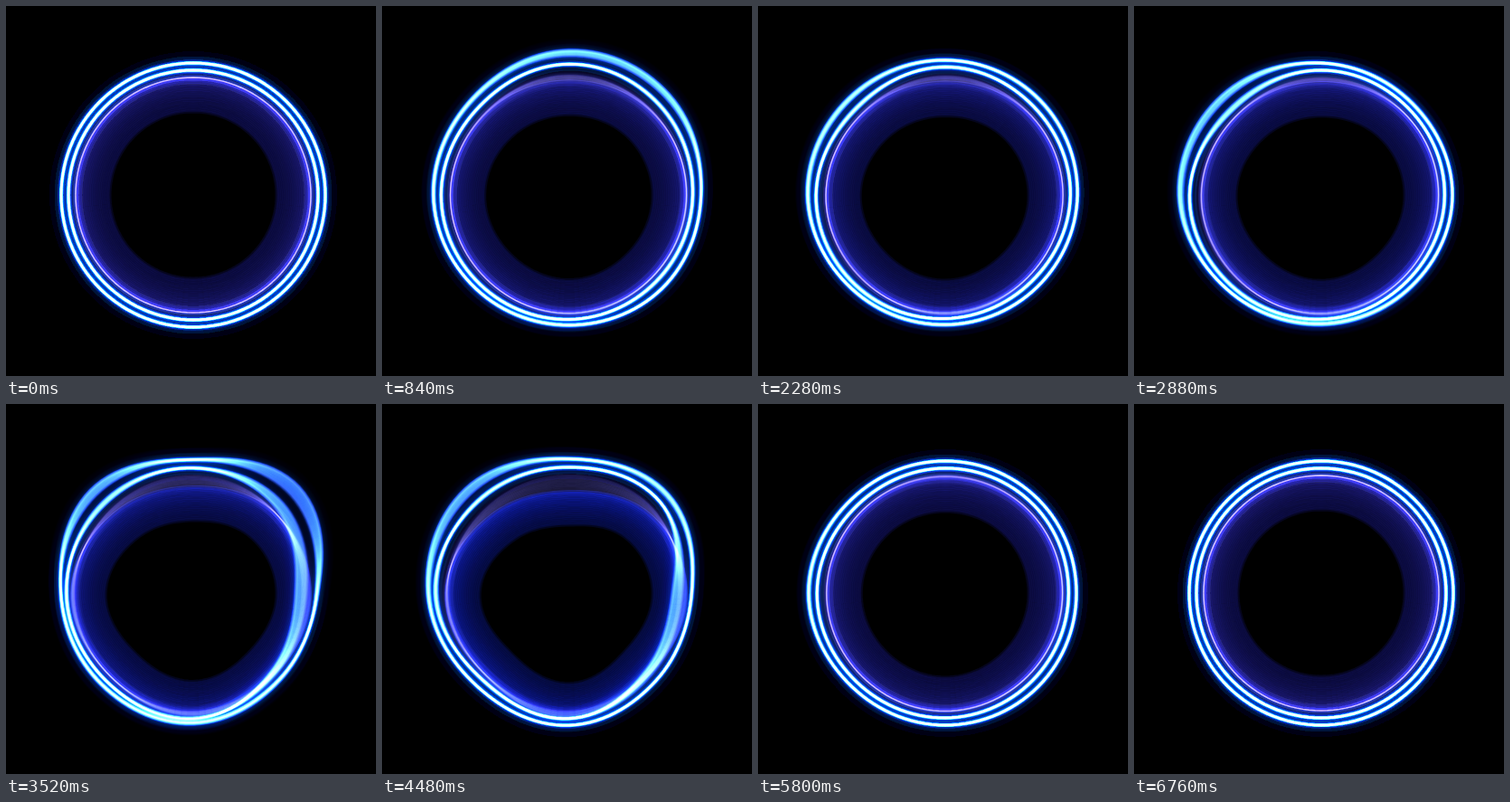
Write an HTML page with a canvas that moves like this. It is 409x409 px and loops after 6800 ms.

```html
<!DOCTYPE html>
<html lang="en">
<head>
<meta charset="utf-8">
<title>Glowing ring</title>
<style>
html, body { margin: 0; width: 100%; height: 100%; overflow: hidden; background: #000; }
canvas { display: block; width: 100vw; height: 100vh; }
</style>
</head>
<body>
<canvas id="stage" width="409" height="409"></canvas>
<script>
const ctx = document.getElementById('stage').getContext('2d');
const LOOP = 6800, STEP = 40, CX = 207, CY = 209, POINTS = 120;
const FLAT = [0, 0, 0, 0, 0, 0, 0, 0];

// Radial offsets at eight angles, clockwise from the right, per key time.
const TIMES = [0, 720, 1680, 2880, 3520, 4480, 5040, 5800, 6760];
const OUTER = [
  FLAT,
  [0, 0, -3, 0, 5, 6, 14, 10],
  [0, -1, -2, -2, 1, 3, 8, 13],
  [-1, -5, -5, 1, 12, 10, 0, -4],
  [-8, -12, -4, -4, 0, 15, 2, 20],
  [-10, -10, 0, -1, 11, 17, 3, 9],
  [-6, -5, 0, 3, 20, 11, 2, 2],
  [-1, 0, 0, 0, 6, 1, 0, 0],
  FLAT
];
const INNER = [
  FLAT,
  [-2, -3, 0, 2, 4, 1, 6, 2],
  [-1, -5, -2, 2, 2, 0, 8, 1],
  [-2, -4, 0, 4, 8, -3, 0, -2],
  [-25, -16, 2, -1, 3, 0, 0, -7],
  [-24, -18, 1, -3, 11, 4, 1, 4],
  [-14, -10, 1, 2, 12, 2, 0, 1],
  [-2, -2, 0, 1, 4, -1, 0, 0],
  FLAT
];
const DENT = [0, 3, 5, 5, 12, 17, 11, 2, 0];
const DENT_SHAPE = [0, -.2, .45, 0, .4, -.45, -1, -.3];

const mix = (a, b, u) => a + (b - a) * u;
const blend = (a, b, u, scale = 1) => a.map((v, i) => mix(v, b[i], u) * scale);

function hermite(a, b, ma, mb, u) {
  const u2 = u * u, u3 = u2 * u;
  return a * (2 * u3 - 3 * u2 + 1) + ma * (u3 - 2 * u2 + u) +
    b * (3 * u2 - 2 * u3) + mb * (u3 - u2);
}

// Smooth value of a keyed channel at time t.
function keyed(t, value) {
  const last = TIMES.length - 1;
  if (t >= TIMES[last]) return value(last);
  let k = 0;
  while (t >= TIMES[k + 1]) k++;
  const span = TIMES[k + 1] - TIMES[k];
  const slope = i => i === 0 || i === last ? 0 :
    (value(i + 1) - value(i - 1)) / (TIMES[i + 1] - TIMES[i - 1]) * span;
  return hermite(value(k), value(k + 1), slope(k), slope(k + 1), (t - TIMES[k]) / span);
}

// Resample eight angle samples to a closed smooth curve.
function spread(shape) {
  const at = i => shape[(i + 8) % 8];
  return Array.from({ length: POINTS }, (_, n) => {
    const x = n / POINTS * 8, i = Math.floor(x);
    return hermite(at(i), at(i + 1), (at(i + 1) - at(i - 1)) / 2,
      (at(i + 2) - at(i)) / 2, x - i);
  });
}

const shapeAt = (table, t) =>
  spread(FLAT.map((_, i) => keyed(t, k => table[k][i])));

function loopPath(radius, offsets) {
  const path = new Path2D();
  offsets.forEach((d, n) => {
    const a = n / POINTS * Math.PI * 2, r = radius + d;
    path.lineTo(CX + r * Math.cos(a), CY + r * Math.sin(a));
  });
  path.closePath();
  return path;
}

function stroke(path, width, r, g, b) {
  ctx.lineWidth = width;
  ctx.strokeStyle = `rgb(${Math.round(r)},${Math.round(g)},${Math.round(b)})`;
  ctx.stroke(path);
}

// A fan of faint strands that burns white where they coincide.
function brightFan(radius, near, far) {
  const count = 20;
  for (let i = 0; i < count; i++) {
    const u = Math.pow(i / (count - 1), 1.4);
    const path = loopPath(radius, blend(near, far, .4 * u, 1 - .3 * u));
    stroke(path, 25, 0, 0, 1);
    stroke(path, 14, 0, 1, 2);
    stroke(path, 7, 0, 1, 5);
    stroke(path, 4, 1, 8, 34);
    stroke(path, 2.8, 13, 13, 8);
  }
}

function lilacFan(dent, inner) {
  const count = 12, wide = blend(inner, FLAT_CURVE, .6);
  for (let i = 0; i < count; i++) {
    const path = loopPath(130, blend(dent, wide, i / (count - 1)));
    stroke(path, 14, 1, 1, 3);
    stroke(path, 6, 2, 2, 6);
    stroke(path, 1.4, 14, 12, 20);
  }
}

function dimBand(dent, depth) {
  const count = 20, warm = 1 - depth / 30;
  for (let i = 0; i < count; i++) {
    const v = i / (count - 1);
    stroke(loopPath(mix(92.5, 129, v), dent), 4,
      (5 + 9 * v * v) * warm, 5 + 8 * v * v, 30 + 30 * v * v + depth * v);
  }
}

const FLAT_CURVE = spread(FLAT);
const DENT_CURVE = spread(DENT_SHAPE);

function draw(t) {
  const outer = shapeAt(OUTER, t), inner = shapeAt(INNER, t);
  const depth = keyed(t, k => DENT[k]);
  const dent = DENT_CURVE.map(v => v * depth);
  ctx.globalCompositeOperation = 'source-over';
  ctx.fillStyle = '#000';
  ctx.fillRect(0, 0, 409, 409);
  ctx.globalCompositeOperation = 'lighter';
  ctx.lineJoin = 'round';
  dimBand(dent, depth);
  lilacFan(dent, inner);
  brightFan(138, inner, outer);
  brightFan(146, outer, inner);
}

const start = performance.now();
let shown = -1;
function tick() {
  const t = Math.floor((performance.now() - start) % LOOP / STEP) * STEP;
  if (t !== shown) draw(shown = t);
  requestAnimationFrame(tick);
}
tick();
</script>
</body>
</html>
```
